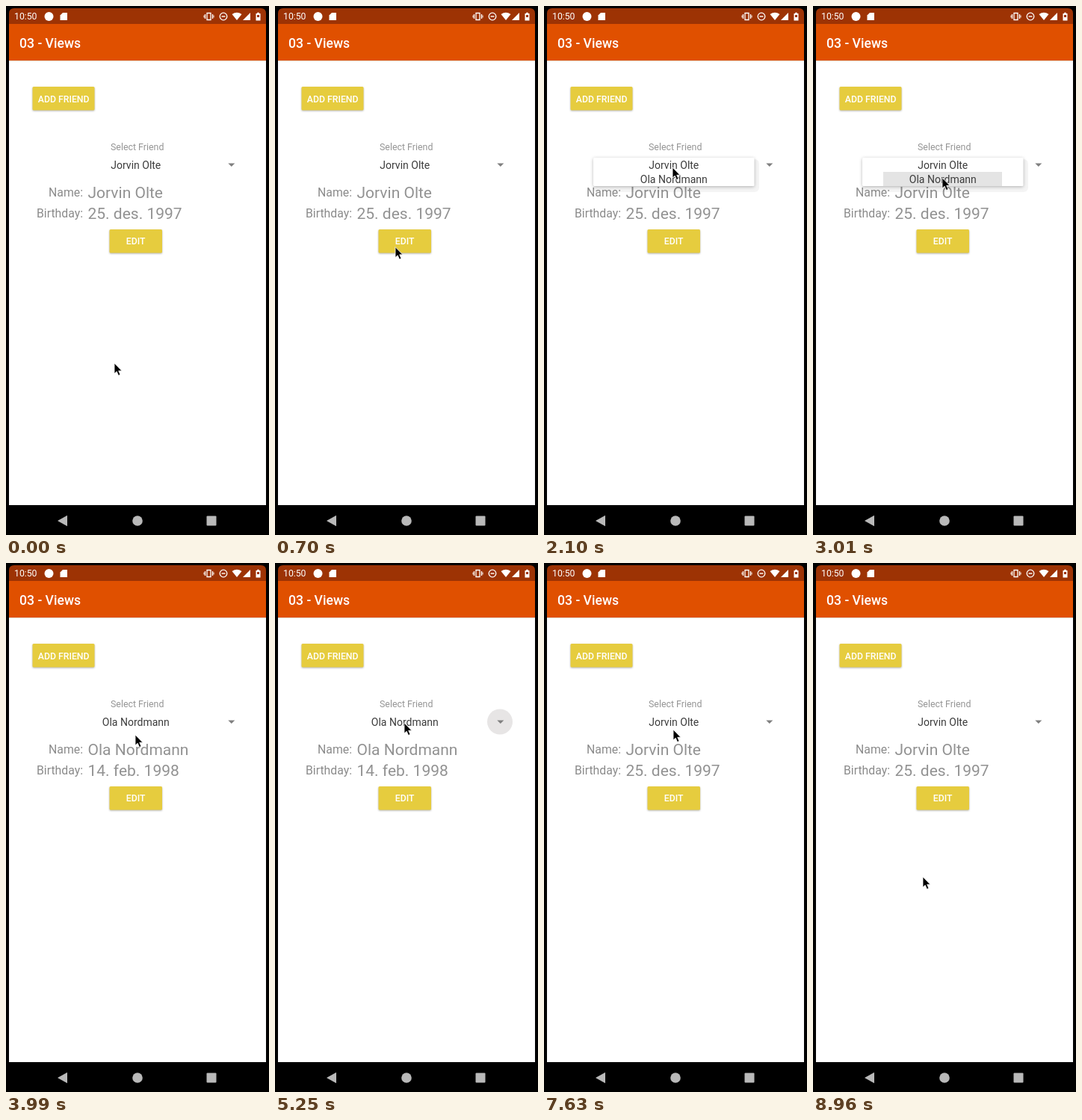
These frames come from a looping animation (352x708 px, 9030 ms). An HTML page:

```html
<!DOCTYPE html>
<html lang="en">
<head>
<meta charset="utf-8">
<title>Friend picker</title>
<style>
html, body { margin: 0; width: 100%; height: 100%; overflow: hidden; background: #000; }
svg { display: block; width: 352px; height: 708px; font-family: Roboto, Arial, sans-serif; }
.mid { text-anchor: middle; }
.end { text-anchor: end; }
.label { font-size: 15.8px; fill: #8b8b8b; }
.value { font-size: 21px; fill: #929292; }
.item { font-size: 14px; fill: #3c3c3c; text-anchor: middle; }
.btn { font-size: 12.25px; font-weight: 500; fill: #fff; text-anchor: middle; }
.raised { filter: drop-shadow(0 1px 1px rgba(0,0,0,.3)); }
#popup .panel { filter: drop-shadow(0 1px 2px rgba(0,0,0,.28)); }
</style>
</head>
<body>
<svg viewBox="0 0 352 708">
  <rect width="352" height="708"/>
  <rect x="4" y="60" width="344" height="608" fill="#fff"/>
  <path d="M4 24V10q0-7 7-7H341q7 0 7 7V24Z" fill="#9d3304"/>
  <rect x="4" y="24" width="344" height="49" fill="#e05000"/>
  <rect x="4" y="73" width="344" height="1" fill="#000" opacity=".1"/>

  <g fill="#fff">
    <text x="11" y="18.4" font-size="12.25">10:50</text>
    <circle cx="57.5" cy="14" r="6"/>
    <path d="M76 9h6v10h-9.500V12.500Z"/>
    <path d="M269 9.500h5v9h-5ZM266.500 11v6M276.500 11v6" fill="none" stroke="#fff" stroke-width="1.300"/>
    <path d="M265 12.500v3M278 12.500v3" stroke="#fff"/>
    <circle cx="291" cy="14" r="4.800" fill="none" stroke="#fff" stroke-width="1.300"/>
    <path d="M288.500 13.300h5v1.400h-5Z"/>
    <path d="M302.500 11Q309 6.500 315.500 11L309 19Z"/>
    <path d="M327 9v10h-10Z"/>
    <path d="M334.500 10h1.700V8.700h2.600V10h1.700v9.500h-6Z"/>
    <text x="18" y="56" font-size="17.6" font-weight="500">03 - Views</text>
  </g>
  <path d="M336 12h3v3h-3Z" fill="#9d3304"/>

  <g fill="#e6cc3e" class="raised">
    <rect x="35.500" y="108" width="83" height="31.500" rx="1.500"/>
    <rect x="138.500" y="299" width="70.500" height="31.500" rx="1.500"/>
  </g>
  <text class="btn" x="77.200" y="129">ADD FRIEND</text>
  <text class="btn" x="173.700" y="319.400">EDIT</text>

  <text x="140" y="193.400" font-size="12.400" fill="#959595">Select Friend</text>
  <circle id="ripple" cy="212.500" fill="#e7e5e5"/>
  <path d="M297.300 210.500h9l-4.500 4.600Z" fill="#808080"/>
  <text id="picked" class="item" x="173.800" y="218"></text>

  <text class="label end" x="103" y="255.300">Name:</text>
  <text class="label end" x="103" y="283.300">Birthday:</text>
  <text id="name" class="value" x="109.500" y="257.400"></text>
  <text id="birthday" class="value" x="109.500" y="285.400"></text>

  <g id="popup">
    <rect x="66" y="205" width="222" height="44" rx="6" opacity=".045"/>
    <rect class="panel" x="66" y="203" width="215.500" height="38" rx="1.500" fill="#fff"/>
    <rect id="press" x="94" width="159" height="19" fill="#e4e4e4"/>
    <text id="row0" class="item" x="173.800" y="218"></text>
    <text id="row1" class="item" x="173.800" y="237"></text>
  </g>

  <g fill="#b9b9b9">
    <path d="M69 689l13-7.300v14.600Z"/>
    <circle cx="176" cy="689" r="6.800"/>
    <rect x="268.500" y="682.500" width="13" height="13" rx="1"/>
  </g>

  <g id="cursor">
    <circle id="ring" r="21.700" fill="none" stroke="#000" stroke-width="1.500"/>
    <path d="M0 0V14L3.200 11.200L5.500 16.500L8 15.400L5.700 10.300H10Z" stroke="#fff" stroke-width=".8"/>
  </g>
</svg>
<script>
const LOOP = 9030, STEP = 70;
const friends = [
  { name: "Jorvin Olte", birthday: "25. des. 1997" },
  { name: "Ola Nordmann", birthday: "14. feb. 1998" }
];
// Each visit opens the list, then picks a row.
const visits = [
  { open: 1400, pick: 2870, row: 1 },
  { open: 5040, pick: 6650, row: 0 }
];
// Pointer moves: start, end, target x, target y.
const moves = [
  [70, 1190, 172, 216],
  [2100, 2730, 173, 230],
  [4130, 4970, 173, 214],
  [7350, 7630, 173, 223],
  [7630, 8470, 147, 420]
];

const $ = id => document.getElementById(id);
const set = (id, attrs) => {
  for (const key in attrs) $(id).setAttribute(key, attrs[key]);
};
const ramp = (t, a, b) => Math.min(1, Math.max(0, (t - a) / (b - a)));
const ease = u => u * u * (3 - 2 * u);
const within = (t, start, length) => t >= start && t < start + length;

friends.forEach((f, i) => $("row" + i).textContent = f.name);

function draw(t) {
  let x = 145, y = 478;
  for (const [a, b, tx, ty] of moves) {
    const u = ease(ramp(t, a, b));
    x += (tx - x) * u;
    y += (ty - y) * u;
  }
  set("cursor", { transform: `translate(${x} ${y})` });

  let chosen = 0, popup = 0, ring = 0, ripple = 0, radius = 0, pressed = 0, row = 0;
  for (const v of visits) {
    if (t >= v.pick + 280) chosen = v.row;
    if (within(t, v.open, 140) || within(t, v.pick, 140)) ring = 1;
    if (within(t, v.open, 420)) {
      radius = Math.min(17, 9 + (t - v.open) / 14);
      ripple = 1 - ramp(t, v.open + 280, v.open + 420);
    }
    if (within(t, v.pick + 70, 210)) {
      pressed = 1;
      row = v.row;
    }
    popup += ramp(t, v.open + 210, v.open + 350) - ramp(t, v.pick + 210, v.pick + 350);
  }
  set("ring", { opacity: ring });
  set("ripple", { cx: 284 + radius, r: radius, opacity: ripple });
  set("press", { y: 203 + 19 * row, opacity: pressed });
  set("popup", { opacity: popup });

  const friend = friends[chosen];
  $("picked").textContent = $("name").textContent = friend.name;
  $("birthday").textContent = friend.birthday;
}

const begin = performance.now();
function tick(now) {
  const t = Math.max(0, now - begin) % LOOP;
  draw(Math.floor(t / STEP) * STEP);
  requestAnimationFrame(tick);
}
draw(0);
requestAnimationFrame(tick);
</script>
</body>
</html>
```
